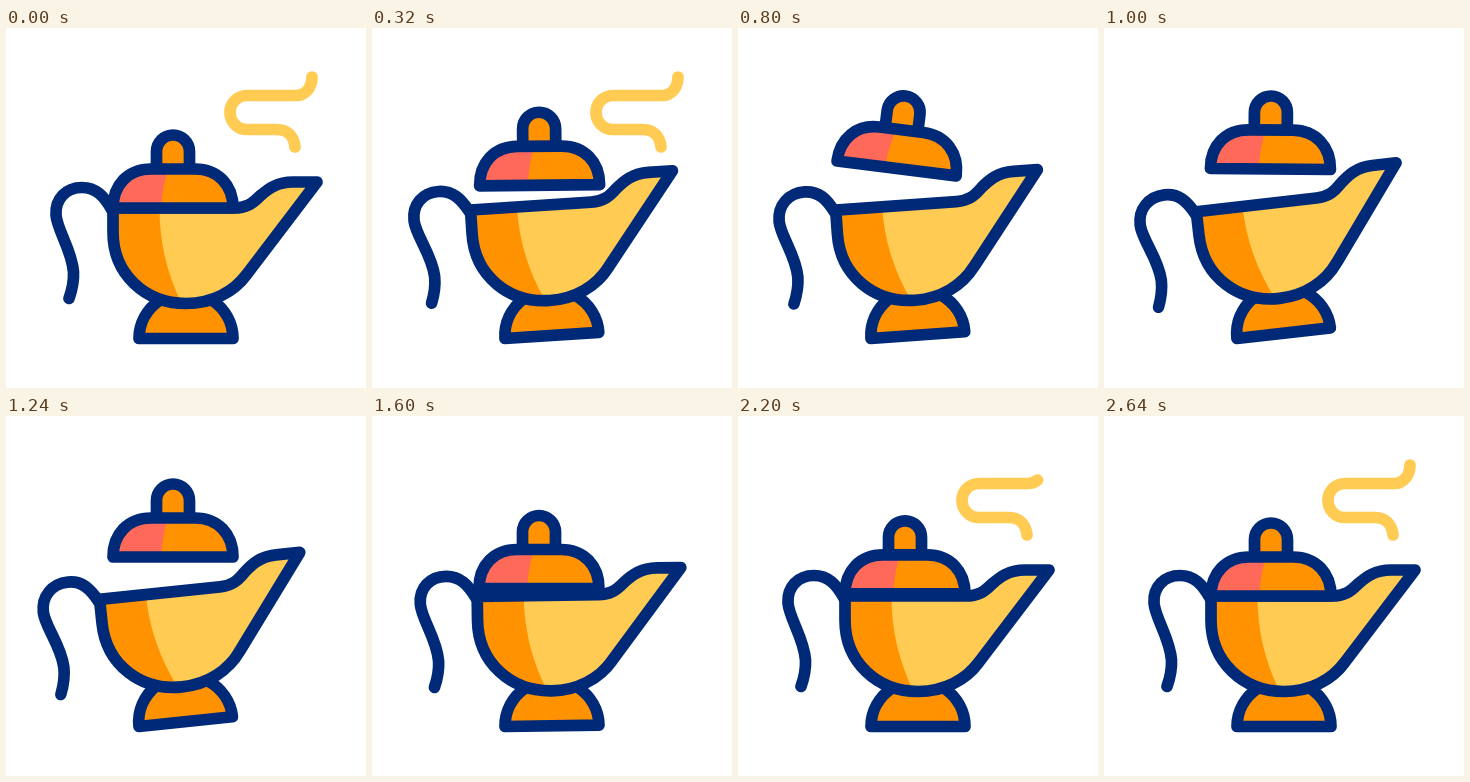
Write an HTML page that moves like this. It is 360 px wide and 360 px high and loops after 3000 ms.

```html
<!DOCTYPE html>
<html lang="en">
<head>
<meta charset="utf-8">
<title>Magic lamp</title>
<style>
  html, body { margin: 0; width: 100%; height: 100%; overflow: hidden; background: #fff; }
  svg { display: block; width: 100%; height: 100%; }
  .line, #smoke { fill: none; stroke-width: 11.7; stroke-linecap: round; stroke-linejoin: round; }
  .line { stroke: #002978; }
  #smoke { stroke: #ffcb52; }
  .orange { fill: #ff9200; }
  .yellow { fill: #ffcb52; }
  .coral { fill: #ff695a; }
</style>
</head>
<body>
<svg viewBox="0 0 360 360">
  <defs>
    <path id="foot" d="M133 310.5C133 295 141 281 154 272H206C219 281 227 295 227 310.5Z"/>
    <path id="bowl" d="M107 180V204C107 246 139 275.5 180 275.5C206 275.5 228 264 241 246L311 154H287C271 154 262 161 254 168C246 176 240 180 228 180Z"/>
    <path id="knob" d="M150.5 141V123.5a16.5 16.5 0 0 1 33 0V141"/>
    <path id="dome" d="M107 180C107 157 122 141 145 141H189C212 141 227 157 227 180Z"/>
    <clipPath id="inBowl"><use href="#bowl"/></clipPath>
    <clipPath id="inDome"><use href="#dome"/></clipPath>
  </defs>
  <path id="smoke" pathLength="1" d="M289 119C288 108 281 101.5 271 101.5H241a17 17 0 0 1 0-34H290C299 67.5 306 60 306 49"/>
  <g id="lamp">
    <path id="handle" class="line" d="M106 182C98 168 90 159.5 76 159.5C60 159.5 49 171 50 187C51 202 66 222 67.5 244C68 254 66 262 63 270.5"/>
    <use href="#foot" class="orange"/>
    <use href="#foot" class="line"/>
    <use href="#bowl" class="yellow"/>
    <path class="orange" clip-path="url(#inBowl)" d="M153.5 170V180C153.5 215 161 247 178 280H90V170Z"/>
    <use href="#bowl" class="line"/>
  </g>
  <g id="lid">
    <use href="#knob" class="orange"/>
    <use href="#knob" class="line"/>
    <use href="#dome" class="orange"/>
    <path class="coral" clip-path="url(#inDome)" d="M163 138Q156 158 155 184H95V138Z"/>
    <use href="#dome" class="line"/>
  </g>
</svg>
<script>
  const LOOP = 3000, STEP = 40;
  const el = id => document.getElementById(id);
  const smoke = el('smoke'), lamp = el('lamp'), handle = el('handle'), lid = el('lid');

  // Timing rules: progress 0..1, smooth step, slowing step, and a there-and-back wave.
  const part = (t, from, to) => Math.min(Math.max((t - from) / (to - from), 0), 1);
  const ease = (t, from, to) => { const p = part(t, from, to); return p * p * (3 - 2 * p); };
  const easeOut = (t, from, to) => 1 - (1 - part(t, from, to)) ** 3;
  const wave = (t, from, to) => Math.sin(Math.PI * part(t, from, to)) ** 2;

  // The lamp leans back, rocks once and settles.
  const tilt = t => 7.2 * (ease(t, 120, 510) - ease(t, 1060, 1740)) - 3.1 * wave(t, 510, 1090);
  const sway = t => 2.8 * (ease(t, 120, 800) - ease(t, 1240, 1600));

  // The lid pops up, swings from its knob, drops and sinks slowly.
  const lift = t => 39 * ease(t, 120, 480) - 30 * ease(t, 1240, 1600) - 9 * ease(t, 1240, 2640);
  const swing = t => 7.1 * wave(t, 560, 1040) - 4.3 * wave(t, 260, 780);

  // The smoke leaves from the spout end, then grows back from it.
  function drawSmoke(t) {
    const back = t > 1200;
    const from = back ? 0 : ease(t, 370, 770);
    const to = back ? easeOut(t, 1660, 2640) : 1;
    const shown = to - from;
    smoke.style.display = shown > 0 ? '' : 'none';
    smoke.setAttribute('stroke-dasharray', shown < 1 ? `${shown} 3` : 'none');
    smoke.setAttribute('stroke-dashoffset', -from);
  }

  function render(t) {
    lamp.setAttribute('transform', `rotate(${-tilt(t)} 133 311)`);
    handle.setAttribute('transform', `translate(0 182) skewX(${-sway(t)}) translate(0 -182)`);
    lid.setAttribute('transform', `translate(0 ${-lift(t)}) rotate(${swing(t)} 167 112)`);
    drawSmoke(t);
  }

  const start = performance.now();
  function tick() {
    const t = (performance.now() - start) % LOOP;
    render(Math.floor(t / STEP) * STEP);
    requestAnimationFrame(tick);
  }
  tick();
</script>
</body>
</html>
```
